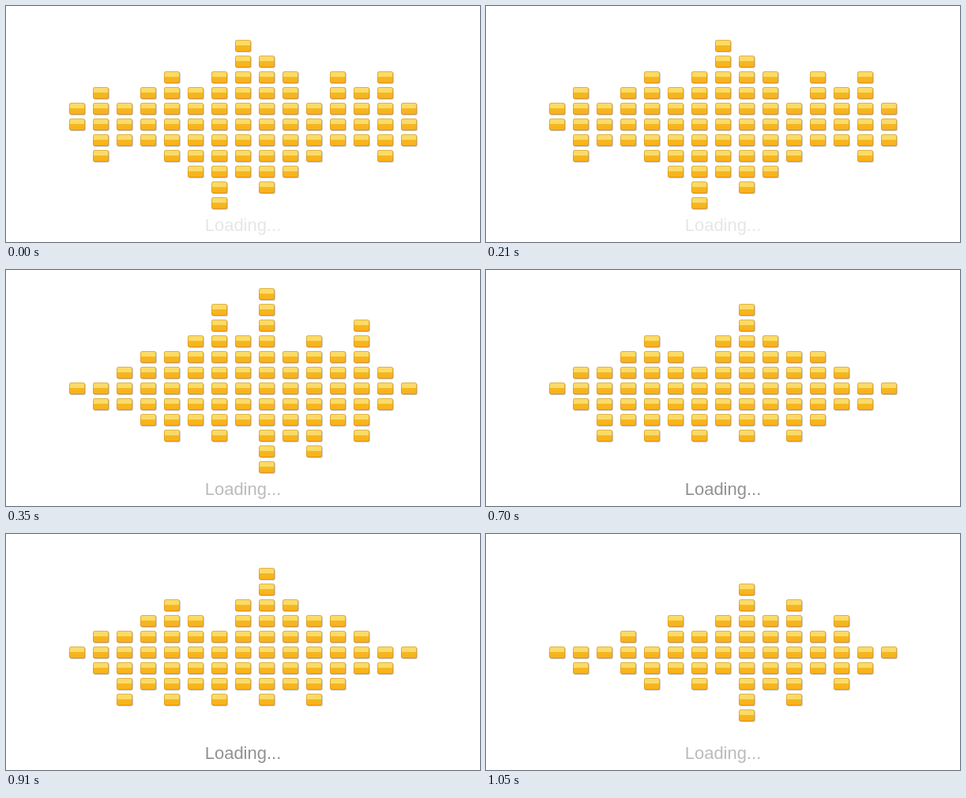
An HTML page for the animation above (1400 ms loop, 600x300 px).

```html
<!DOCTYPE html>
<html lang="en">
<head>
<meta charset="utf-8">
<title>Loading</title>
<style>
  html, body { margin: 0; width: 100%; height: 100%; overflow: hidden; background: #fff; }
  svg { display: block; width: 100%; height: 100%; }
  text { font: 22px "Liberation Sans", Arial, sans-serif; text-anchor: middle; }
</style>
</head>
<body>
<svg viewBox="0 0 600 300">
  <defs>
    <linearGradient id="body" x2="0" y2="1">
      <stop offset="0" stop-color="#fbd968"/>
      <stop offset=".43" stop-color="#fbdc66"/>
      <stop offset=".43" stop-color="#f3b824"/>
      <stop offset="1" stop-color="#fcb117"/>
    </linearGradient>
    <linearGradient id="edge" x2="0" y2="1">
      <stop offset="0" stop-color="#dfb545"/>
      <stop offset="1" stop-color="#e3951a"/>
    </linearGradient>
    <g id="brick">
      <rect x="1" y="1" width="20" height="15" rx="2.5" fill="#000" opacity=".13"/>
      <rect x=".5" y=".8" width="20" height="15" rx="2.5" fill="#000" opacity=".16"/>
      <rect width="20" height="15" rx="2.5" fill="url(#edge)"/>
      <rect x="1" y="1" width="18" height="13" rx="1.5" fill="url(#body)"/>
    </g>
  </defs>
  <g id="bars"></g>
  <text id="label" x="300" y="286">Loading...</text>
</svg>
<script>
  const STEP = 350, MIDDLE = 6, ROWS = 12, COLS = 15;
  // Bricks above and below the middle row, one digit per column.
  const poses = [
    { up: "121232354313231", down: "021123534321121", ink: "#e6e6e6" },
    { up: "001223536232410", down: "011232325342310", ink: "#bbbbbb" },
    { up: "011232135322100", down: "013232323232110", ink: "#919191" },
    { up: "000102124231200", down: "010121214231210", ink: "#bbbbbb" }
  ];
  const bars = document.getElementById("bars");
  const label = document.getElementById("label");
  const bricks = [];

  for (let col = 0; col < COLS; col++) {
    for (let row = 0; row < ROWS; row++) {
      const el = document.createElementNS("http://www.w3.org/2000/svg", "use");
      el.setAttribute("href", "#brick");
      el.setAttribute("x", 80 + 30 * col);
      el.setAttribute("y", 23 + 20 * row);
      bars.append(el);
      bricks.push({ el, col, offset: row - MIDDLE });
    }
  }

  function draw(time) {
    const { up, down, ink } = poses[Math.floor(time / STEP) % poses.length];
    for (const { el, col, offset } of bricks) {
      const lit = offset >= -up[col] && offset <= +down[col];
      el.setAttribute("visibility", lit ? "visible" : "hidden");
    }
    label.setAttribute("fill", ink);
  }

  const start = performance.now();
  function tick() {
    draw(performance.now() - start);
    requestAnimationFrame(tick);
  }
  tick();
</script>
</body>
</html>
```
